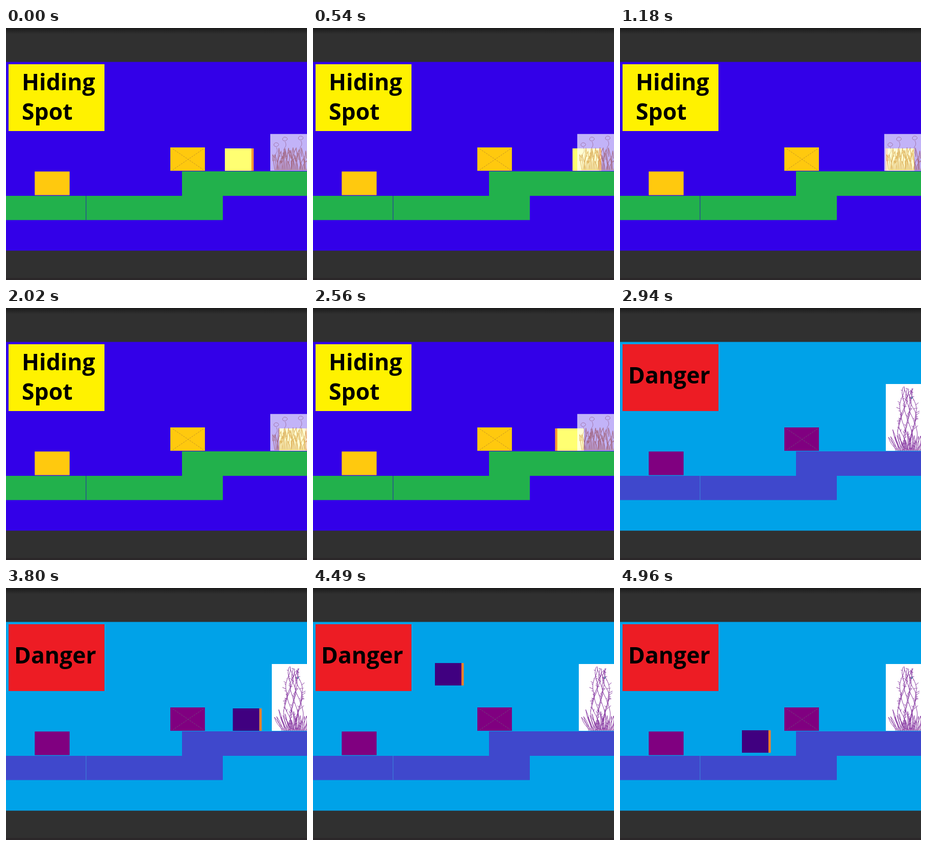
Write an HTML page that moves like this. It is 590 px wide and 494 px high and loops after 5030 ms.

```html
<!DOCTYPE html>
<html lang="en">
<head>
<meta charset="utf-8">
<title>Hiding Spot</title>
<style>
  html, body { margin: 0; width: 100%; height: 100%; overflow: hidden; background: #303030; }
  svg { display: block; }
  text { font: bold 44.5px "Open Sans", "Noto Sans", sans-serif; fill: #000; }
</style>
</head>
<body>
<svg id="stage" width="590" height="494" viewBox="0 0 590 494"></svg>
<script>
const LOOP = 5030, STEPS = 65;
const SWITCH = 38, RETURN = 42, START = 46, HIT = 50, FALL = 52;
const DAY = { sky: '#3300e8', ground: '#22b14c', seam: '#2b3ba0', crate: '#ffc90e', edge: '#e8b428',
  cross: '#b9852a', body: '#ffff72', face: '#ff9a30' };
const DANGER = { sky: '#00a2e8', ground: '#3f48cc', seam: '#3b7fd8', crate: '#800080', edge: '#75108c',
  cross: '#6c5a7c', body: '#400080', face: '#ff7f27' };

// Where the player turns while trying the hiding spot: step, x
const TURNS = [[0, 429], [10, 552], [15, 525], [19, 540], [22, 530], [25, 530], [27, 541], [33, 479], [37, 552]];

let seed = 7;
const rnd = (a, b) => {
  seed = (seed * 16807) % 2147483647;
  return a + (b - a) * seed / 2147483647;
};
const clamp = u => Math.min(1, Math.max(0, u));
const mix = (a, b, u) => a + (b - a) * u;
const smooth = u => u * u * (3 - 2 * u);
const n = v => v.toFixed(1);
const rect = (x, y, w, h, fill, more = '') =>
  `<rect x="${x}" y="${y}" width="${w}" height="${h}" fill="${fill}" ${more}/>`;
const line = (d, color, width, more = '') =>
  `<path d="${d}" fill="none" stroke="${color}" stroke-width="${width}" ${more}/>`;
const panel = (x, y, w, h, art, more = '') =>
  `<svg x="${x}" y="${y}" width="${w}" height="${h}" viewBox="${x} ${y} ${w} ${h}" ${more}>` +
  rect(x, y, w, h, '#fff') + art + '</svg>';

function reeds() {
  let d = '';
  for (let x = 527; x < 592; x += 1.9) {
    const h = rnd(18, 46), lean = rnd(-8, 9);
    d += `M${n(x)} 279q${n(rnd(-3, 3))} ${n(-h * .6)} ${n(lean)} ${n(-h)}l${n(rnd(0, 3))} ${n(h * .4)}`;
  }
  let heads = '';
  for (const [x, y] of [[530, 229], [547, 218], [578, 216]]) {
    heads += `M${x - 5} ${y}q1-5 6-4q5 2 3 5q-3 4-7 2q-2-1-2-3m5 5q4 7-1 12q-2 8 3 18`;
  }
  return panel(518, 207.5, 72, 72.5, line(d, '#d8a068', 1.2) + line(heads, '#d0a890', 1), 'opacity=".7"');
}

function coral() {
  let d = '';
  for (let s = -4; s <= 4; s++) {
    const top = 152 + rnd(0, 14), phase = s * 1.9;
    for (let y = 278; y > top; y -= 4) {
      const x = 564 + s * 4.6 * (.75 + .25 * Math.cos(y / 18)) + 4 * Math.sin(y / 10 + phase);
      const side = rnd(-5, 5) + s * .6;
      d += (y === 278 ? 'M' : 'L') + n(x) + ' ' + y;
      if (rnd(0, 1) < .4) d += `l${n(side)} ${n(rnd(-5, 0))}M${n(x)} ${y}`;
    }
  }
  // Blades fan out from the foot
  for (let s = -9; s <= 9; s++) {
    const tip = 564 + s * 4.2, h = rnd(16, 42), foot = 564 + s * 2.6;
    d += `M${n(foot)} 280Q${n(mix(foot, tip, .2))} ${n(280 - h * .5)} ${n(tip)} ${n(280 - h)}`;
    d += `Q${n(tip + 3)} ${n(280 - h * .5)} ${n(foot + 4)} 280`;
  }
  return panel(521, 149, 69, 131, line(d, '#8b3fa5', 1) + rect(571, 174, 2, 4, '#3f7f9f'));
}

const crate = (x, y, c) => rect(x, y, 68, 46, c.crate) +
  rect(x + .5, y + .5, 67, 45, 'none', `stroke="${c.edge}"`);

function scene(c, id, cover) {
  return `<g id="${id}">` + rect(0, 66, 590, 371, c.sky) +
    rect(0, 329, 425, 47.5, c.ground) + rect(345, 281, 245, 48, c.ground) +
    rect(156.3, 329, 1.2, 47.5, c.seam) + crate(56.5, 281.5, c) + crate(322, 234, c) +
    line('M327 237L387 278M387 237L327 278', c.cross, .8, 'stroke-dasharray="3 2"') +
    `<g class="player">${rect(0, 0, 52, 44, c.body)}${rect(52, 0, 4.5, 44, c.face, 'class="face"')}</g>` +
    cover + '</g>';
}

const label = (id, fill, words) => `<g id="${id}">${rect(5, 71, 188, 131, fill)}${words}</g>`;

const stage = document.getElementById('stage');
stage.innerHTML =
  `<defs><clipPath id="iris"><polygon/></clipPath>
   <linearGradient id="shade" x2="0" y2="1"><stop stop-color="#1b1b1b"/><stop offset="1" stop-color="#303030"/></linearGradient></defs>` +
  scene(DANGER, 'danger', coral()) + scene(DAY, 'day', reeds()) +
  label('calm', '#fff200', '<text x="31" y="122">Hiding</text><text x="31" y="179.5">Spot</text>') +
  label('alert', '#ed1c24', '<text x="16" y="148">Danger</text>') +
  rect(0, 0, 590, 66.5, '#303030') + rect(0, 0, 590, 12, 'url(#shade)') +
  rect(0, 436.5, 590, 58, '#303030') + rect(0, 490, 590, 4, '#2b2729');

const $ = s => stage.querySelector(s);
const day = $('#day'), danger = $('#danger'), calm = $('#calm'), alertBox = $('#alert'), iris = $('#iris polygon');
const players = [...stage.querySelectorAll('.player')];
const show = (el, on) => el.setAttribute('visibility', on ? 'visible' : 'hidden');

function hide(k) {
  const i = Math.max(1, TURNS.findIndex(p => p[0] >= k));
  const [k0, x0] = TURNS[i - 1], [k1, x1] = TURNS[i];
  return { x: mix(x0, x1, smooth((k - k0) / (k1 - k0))), y: 236, right: x1 >= x0 };
}

// Run into the coral, get thrown back, then fall
function crash(k) {
  if (k <= HIT) return { x: mix(429, 466, clamp((k - START) / (HIT - START)) ** 3), y: 236, right: true };
  if (k <= FALL) {
    const u = (k - HIT) / (FALL - HIT);
    return { x: mix(466, 218, u), y: mix(236, 93, u), right: true };
  }
  return { x: mix(218, 239, clamp((k - FALL) / 3)), y: 93 + 2.23 * (k - FALL) ** 1.78, right: true };
}

function setIris(r) {
  const pts = Array.from({ length: 32 }, (_, i) => {
    const a = i * Math.PI / 16;
    return n(272 + r * Math.cos(a)) + ',' + n(250 + r * Math.sin(a));
  });
  iris.setAttribute('points', pts.join(' '));
}

function draw(ms) {
  const k = Math.floor((ms % LOOP) / LOOP * STEPS);
  const isDay = k < SWITCH;
  const { x, y, right } = k < SWITCH ? hide(Math.min(k, 37)) : crash(k);
  for (const p of players) {
    p.setAttribute('transform', `translate(${n(x)} ${n(y)})`);
    p.querySelector('.face').setAttribute('x', right ? 52 : -4.5);
  }
  players[0].setAttribute('opacity', clamp((k - RETURN + 1) / 4));
  show(day, isDay);
  show(calm, isDay);
  show(alertBox, !isDay);
  show(danger, k >= SWITCH - 2);
  setIris(k < SWITCH - 2 ? 600 : 246 + 64 * (SWITCH - 1 - k));
  day.setAttribute('clip-path', 'url(#iris)');
}

const start = performance.now();
function tick() {
  draw(performance.now() - start);
  requestAnimationFrame(tick);
}
tick();
</script>
</body>
</html>
```
